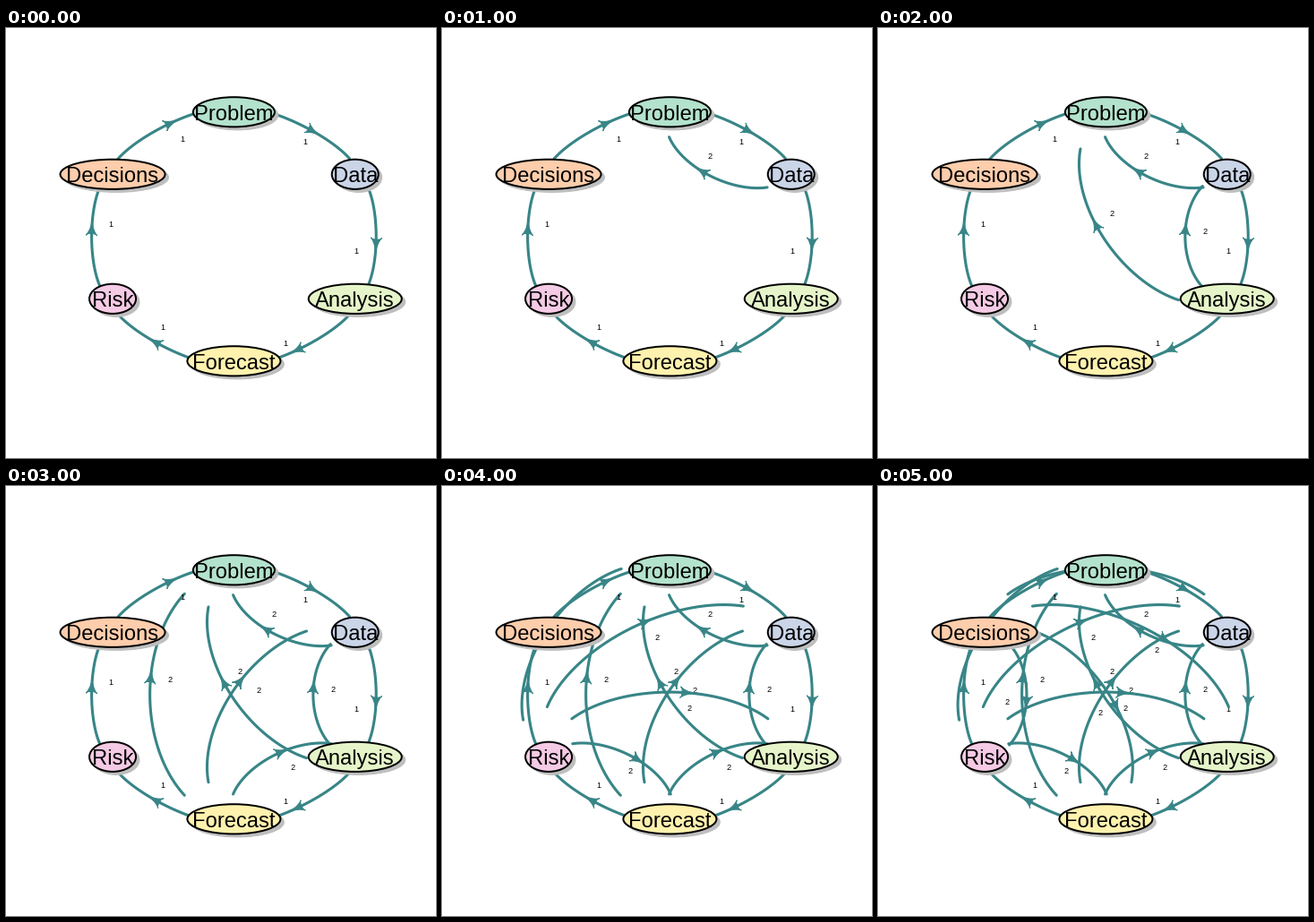
Recreate the animation shown at these times as a matplotlib script. Size 480 by 480 pixels, loop 6000 ms.

```python
import numpy as np
import matplotlib.pyplot as plt
from matplotlib.animation import FuncAnimation
from matplotlib.patches import Ellipse, Polygon

SIZE, DPI = 480, 80
PT = 72 / DPI                      # points per pixel
LEFT, BOTTOM = 59.04, 406.56       # plot area inside the stage
WIDTH, HEIGHT = 390.72, 347.52
RING = 0.4
ARROW_AT = 0.55                    # arrow position along each arc
TEAL = "#388587"
FONT = "Liberation Sans"

NODES = {
    "Problem": "#B3E2CD", "Data": "#CBD5E8", "Analysis": "#E6F5C9",
    "Forecast": "#FFF2AE", "Risk": "#F4CAE4", "Decisions": "#FDCDAC",
}
COUNT = len(NODES)


def node_pos(i):
    a = np.pi / 2 - i * 2 * np.pi / COUNT
    return np.array([0.5 + RING * np.cos(a), 0.5 + RING * np.sin(a)])


def to_px(p):
    p = np.asarray(p)
    return np.stack([LEFT + WIDTH * p[..., 0], BOTTOM - HEIGHT * p[..., 1]], -1)


def direction(start, end):
    d = node_pos(end) - node_pos(start)
    return d / np.hypot(*d)


def arc(start, end, bend, s):
    """Points at fractions s of the half ellipse that bulges left of travel."""
    a, b = node_pos(start), node_pos(end)
    dist = np.hypot(*(b - a))
    u = direction(start, end)
    left = np.array([-u[1], u[0]])
    t = np.pi * np.atleast_1d(s)[:, None]
    return to_px((a + b) / 2 - dist / 2 * np.cos(t) * u
                 + bend * dist * np.sin(t) * left)


def label_offset(start, end, bend):
    """Shift in pixels from the arrow to its label, right of travel."""
    c, s = direction(start, end)
    # Upright edges lean one way or the other depending on their bend.
    lean = np.clip(1e4 * s * (c + 0.01 * (bend - 0.2)), -1, 1)
    return np.array([21.5 * s, 15.5 * c + 3.7 * lean + 0.8])


def head_shape(length=19.0, width=12.0):
    """Arrowhead with curved flanks, centred, pointing along +x."""
    t = np.linspace(0, np.pi / 4, 12)
    x, y = -np.sin(t), 1 - np.cos(t)
    b = np.linspace(1, -1, 15) * np.pi / 2
    back_x, back_y = x[-1] + 0.25 * y[-1] * np.cos(b), y[-1] * np.sin(b)
    xs = np.concatenate([x, back_x, x[::-1]]) * length / -x[-1]
    ys = np.concatenate([y, back_y, -y[::-1]]) * width / (2 * y[-1])
    return np.stack([xs + length / 2, ys], -1)


HEAD = head_shape()

fig = plt.figure(figsize=(SIZE / DPI, SIZE / DPI), dpi=DPI, facecolor="white")
ax = fig.add_axes([0, 0, 1, 1])
ax.set_xlim(0, SIZE)
ax.set_ylim(SIZE, 0)
ax.axis("off")


def write(x, y, text, px, z):
    return ax.text(x, y, text, family=FONT, fontsize=px * PT, color="black",
                   ha="center", va="baseline", zorder=z)


def draw_edge(start, end, bend, label, z):
    path = arc(start, end, bend, np.linspace(0.2, 0.8, 80))
    line, = ax.plot(*path.T, color=TEAL, lw=3.1 * PT, zorder=z,
                    solid_capstyle="round")
    p0, mid, p1 = arc(start, end, bend, ARROW_AT + np.array([-0.001, 0, 0.001]))
    c, s = (p1 - p0) / np.hypot(*(p1 - p0))
    shape = HEAD @ np.array([[c, s], [-s, c]]) + mid
    head = ax.add_patch(Polygon(shape, facecolor=TEAL, edgecolor=TEAL,
                                lw=PT, joinstyle="round", zorder=z))
    x, y = mid + label_offset(start, end, bend)
    return line, head, write(x, y + 3.4, label, 9.2, z + 0.5)


def draw_node(i, name, fill):
    x, y = to_px(node_pos(i))
    size = (13 * len(name), 33.2)
    ax.add_patch(Ellipse((x + 3.9, y + 3.5), *size, facecolor="#BEBEBE",
                         edgecolor="#BEBEBE", lw=PT, zorder=100 + i))
    ax.add_patch(Ellipse((x, y), *size, facecolor=fill, edgecolor="black",
                         lw=2 * PT, zorder=100 + i))
    write(x, y + 9, name, 23.7, 110)


# Steps lead round the ring; returns lead back to every earlier node.
# Edges stack by their end node, then by their start node.
returns = []
z = 2
for end in range(COUNT):
    for start in range(COUNT):
        if (start + 1) % COUNT == end:
            draw_edge(start, end, 0.15, "1", z)
        elif start > end:
            returns.append((start, draw_edge(start, end, 0.3, "2", z)))
        z += 1

for i, (name, fill) in enumerate(NODES.items()):
    draw_node(i, name, fill)


def update(frame):
    shown = []
    for start, parts in returns:
        for part in parts:
            part.set_visible(start <= frame)
            shown.append(part)
    return shown


anim = FuncAnimation(fig, update, frames=COUNT, interval=1000, repeat=True,
                     repeat_delay=0, init_func=lambda: update(0))
plt.show()
```
